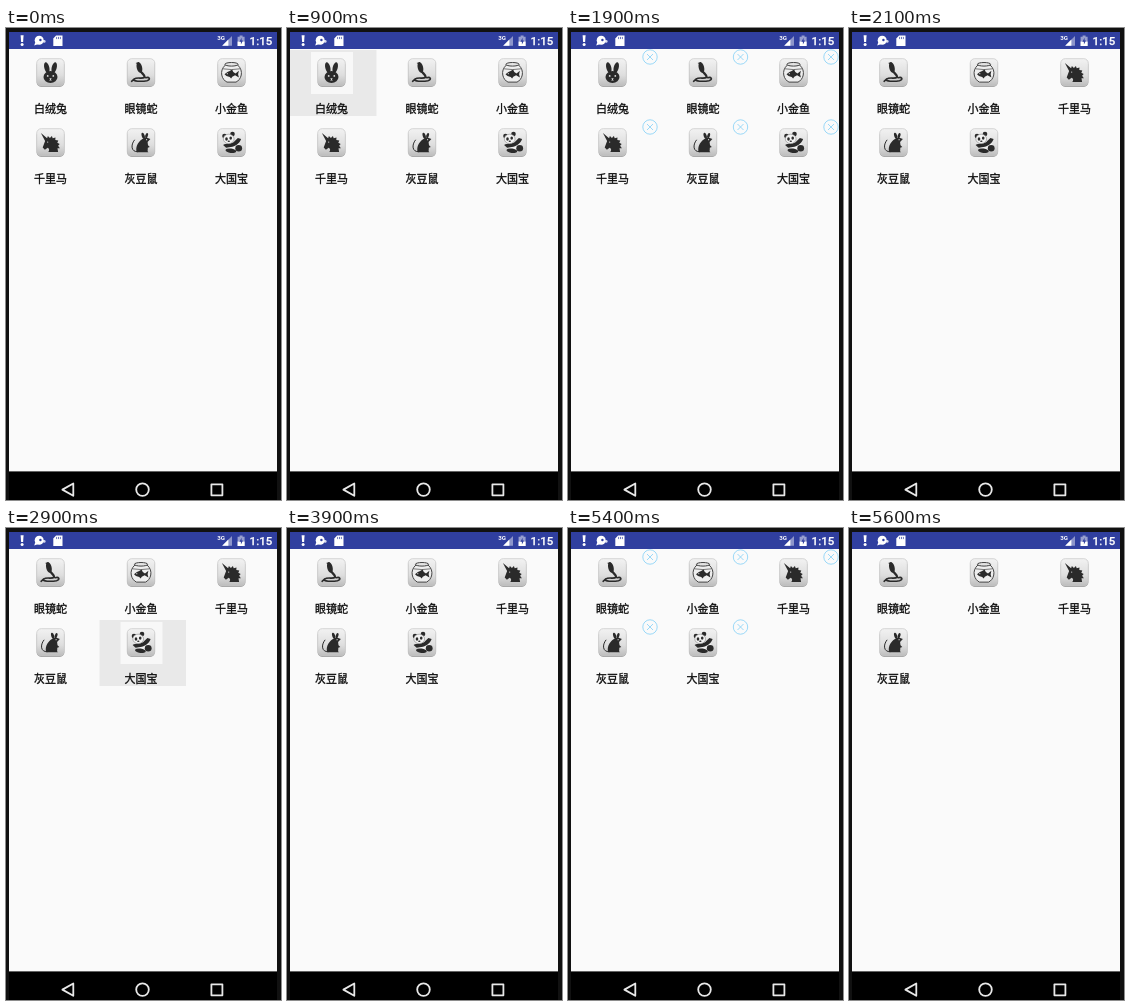
Write an HTML page that moves like this. It is 275 by 472 pixels and loops after 6900 ms.

```html
<!DOCTYPE html>
<html lang="zh-CN">
<head>
<meta charset="utf-8">
<style>
  html, body { margin: 0; height: 100%; overflow: hidden; background: #111; }
  svg { display: block; width: 100%; height: 100%; }
  .label { font: 500 11px "Noto Sans CJK SC", "Noto Sans CJK", sans-serif; text-anchor: middle; fill: #0c0c0c; stroke: #0c0c0c; stroke-width: .3; }
  .badge { fill: none; stroke: #8ad2f7; stroke-width: .85; }
  .clock { font: 500 11.5px Roboto, sans-serif; fill: #fff; stroke: #fff; stroke-width: .25; }
  .net { font: 700 6.2px Roboto, sans-serif; fill: #fff; }
  .line { fill: none; stroke: #2a2a2a; stroke-linecap: round; }
</style>
</head>
<body>
<svg viewBox="0 0 275 472">
  <defs>
    <linearGradient id="key" x2="0" y2="1">
      <stop offset="0" stop-color="#f2f2f2"/>
      <stop offset=".6" stop-color="#dedede"/>
      <stop offset="1" stop-color="#bcbcbc"/>
    </linearGradient>
  </defs>
  <rect width="275" height="472" fill="#111"/>
  <rect x="3" y="4" width="268" height="17" fill="#303f9f"/>
  <rect x="3" y="21" width="268" height="423" fill="#fafafa"/>
  <rect x="3" y="443.4" width="268" height="28.6"/>

  <g fill="#fff">
    <path d="M14.6 7.3h3l-.5 6.8h-2z"/>
    <circle cx="16.1" cy="16.6" r="1.5"/>
    <path d="M47.3 10.4l2.8-2.9h6.4V18h-9.2z"/>
    <path d="M50.6 8.9v2.2M52.5 8.9v2.2M54.4 8.9v2.2" stroke="#303f9f" stroke-width=".7"/>
    <circle cx="33.2" cy="12.2" r="4.5"/>
    <circle cx="34.4" cy="12" r="1.2" fill="#303f9f"/>
    <path d="M29.4 14l-1.2 3.6 3.6-1.4z"/>
    <circle cx="38.2" cy="13.4" r="1.4" opacity=".8"/>
    <path d="M226 8v9.8h-9.8z" opacity=".45"/>
    <path d="M222.4 11.6v6.2h-6.2z"/>
    <path d="M231.6 8.8h2V7.6h3v1.2h2V18h-7z" opacity=".5"/>
    <path d="M231.6 13.6h7V18h-7z"/>
    <path d="M235.6 9.7l-2.2 4h1.5v2.7l2.1-3.9h-1.4z" fill="#303f9f"/>
  </g>
  <text class="net" x="211.2" y="11.9">3G</text>
  <text class="clock" x="243.6" y="17">1:15</text>

  <g id="grid"></g>

  <g fill="none" stroke="#e8e8e8" stroke-width="1.8" stroke-linejoin="round">
    <path d="M67.3 455.5v12.3L56.4 461.6z"/>
    <circle cx="136.5" cy="461.6" r="6.3"/>
    <rect x="205.4" y="456.3" width="11" height="11"/>
  </g>
</svg>
<script>
const LOOP = 6900;

// removed: when the cell is deleted; pressed: spans with the touch highlight
const animals = [
  { name: '白绒兔', removed: 2100, pressed: [[900, 1900]], art: `
    <ellipse cx="-3.7" cy="-4.8" rx="2.5" ry="5.6" transform="rotate(-14 -3.7 -4.8)"/>
    <ellipse cx="3.7" cy="-4.8" rx="2.5" ry="5.6" transform="rotate(14 3.7 -4.8)"/>
    <ellipse cy="4.6" rx="7" ry="6"/>
    <g fill="#ddd"><circle cx="-2.8" cy="3.4" r=".9"/><circle cx="2.8" cy="3.4" r=".9"/>
    <path d="M-1.2 5.8h2.4L.4 7l1 1.1h-2.8L-.4 7z"/></g>` },
  { name: '眼镜蛇', art: `
    <ellipse cx="-1.6" cy="-5" rx="2.7" ry="5.4" transform="rotate(-14 -1.6 -5)"/>
    <path d="M-5.4-9.4L-2-10.5L-1.5-7z"/>
    <path class="line" stroke-width="2.3" d="M-.6-1.5C.8 1 4 2.6 3.6 4.6"/>
    <path class="line" stroke-width="1.6" d="M3.6 4.6C1.5 7-3.5 4.2-7 6.6C-9.5 9 1 9.2 6 8.2C10.5 6.8 7.8 4 4.8 5.2M-7 6.6L-9.4 8.8"/>` },
  { name: '小金鱼', art: `
    <path d="M-6-7.6C-13-1.5-9.5 7.5-4.5 9.6H4.5C9.5 7.5 13-1.5 6-7.6z" fill="#eee" stroke="#444" stroke-width="1"/>
    <ellipse cy="-8.2" rx="6.6" ry="1.8" fill="#e4e4e4" stroke="#444" stroke-width="1"/>
    <path class="line" stroke-width=".6" d="M-8-3.6Q0-2.2 8-3.6"/>
    <path d="M-7 1.8Q-3.8-1.2-1.8-1.4L.6-3L1.8-.6L4 1L7.4-1.8L6.6 1.8L7.4 5L3.6 2.8L.8 4.2L-.4 6L-1.8 4.6Q-5 4.4-7 1.8z"/>
    <circle cx="-4.2" cy="1.2" r=".6" fill="#ddd"/>` },
  { name: '千里马', art: `
    <path d="M-9.6-9.6L-3.4-4.2L-2.6-6.6L-.6-4.6L1.4-6.6L2.2-4.2L5-5L4.8-2.4L7.8-2L6.8.2L9.2 1.6L7.6 3.2L9.4 5.8L7 5.8L7.6 9.6H-2.2C-.8 7.4-1.2 6-2.8 5.2L-5.6 7.2L-7.8 5L-5.4-1.6z"/>
    <circle cx="-2.8" cy="-.4" r=".6" fill="#ddd"/>` },
  { name: '灰豆鼠', art: `
    <path d="M-4.2 9.8C-6.2 4 -2-2.6 3.4-4.6L5.4-5L9.4-3.4L6.6-.4L7 2.8L8.8 4.4L6.8 5.2C7 7.4 6 8.6 7.4 9.8z"/>
    <ellipse cx="2.2" cy="-6.6" rx="1.5" ry="3.2" transform="rotate(-16 2.2 -6.6)"/>
    <ellipse cx="5.6" cy="-6.8" rx="1.3" ry="2.8" transform="rotate(18 5.6 -6.8)"/>
    <path class="line" stroke-width="1" d="M-3.4 9.2C-10 9.6-10.5 2.5-6.6-2.4"/>
    <circle cx="5.6" cy="-2.8" r=".6" fill="#ddd"/>` },
  { name: '大国宝', removed: 5600, pressed: [[2900, 3900], [4300, 5400]], art: `
    <ellipse cx="2" cy="3.2" rx="7" ry="5" fill="#efefef" transform="rotate(18 2 3.2)"/>
    <path d="M-8.4 2.4C-5 .6-1 1.8 2-.2L6.4-4.6L9.6-3.4C8.6 0 5 3.4 1 4.2L-5.4 5.2z"/>
    <ellipse cx="7.2" cy="5.8" rx="3.4" ry="3.2"/>
    <ellipse cx="-.6" cy="8.2" rx="5.4" ry="2.2" transform="rotate(8 -.6 8.2)"/>
    <circle cx="-7" cy="-6.4" r="2.3"/><circle cx="1" cy="-8.4" r="2.3"/>
    <ellipse cx="-2.8" cy="-3.6" rx="5.4" ry="4.7" fill="#f2f2f2" stroke="#777" stroke-width=".5"/>
    <ellipse cx="-5" cy="-3.5" rx="1.3" ry="1.7"/><ellipse cx="-.8" cy="-4.4" rx="1.3" ry="1.7"/>
    <ellipse cx="-2.7" cy="-1.2" rx="1.2" ry=".8"/>` },
];

const cellMarkup = ({ name, art }) => `<g>
  <g class="press"><rect width="86.5" height="66" fill="#e9e9e9"/>
    <rect x="21" y="2" width="42" height="42" fill="#f8f8f8"/></g>
  <g transform="translate(41.5 22.5)" fill="#2a2a2a">
    <rect x="-13.8" y="-12" width="27.6" height="26.4" rx="4.5" fill="#9a9a9a"/>
    <rect x="-13.8" y="-13.8" width="27.6" height="27.3" rx="4.5" fill="url(#key)" stroke="#c6c6c6" stroke-width=".7"/>
    ${art}</g>
  <text class="label" x="41.5" y="62.6">${name}</text>
  <path class="badge" d="M71.8 7a7.2 7.2 0 1 0 14.4 0a7.2 7.2 0 1 0-14.4 0M76 4l6 6M82 4l-6 6"/>
</g>`;

const grid = document.getElementById('grid');
grid.innerHTML = animals.map(cellMarkup).join('');
const cells = animals.map((animal, i) => {
  const node = grid.children[i];
  return { ...animal, node, press: node.querySelector('.press'), badge: node.querySelector('.badge') };
});

const within = (t, spans = []) => spans.some(([from, to]) => t >= from && t < to);
const show = (node, on) => node.setAttribute('display', on ? 'inline' : 'none');

function render(now) {
  const t = now % LOOP;
  const editing = within(t, [[1300, 2100], [4700, 5600]]);
  let slot = 0;
  for (const { node, press, badge, removed = LOOP, pressed } of cells) {
    const present = t < removed;
    show(node, present);
    if (!present) continue;
    node.setAttribute('transform', `translate(${3 + slot % 3 * 90.5} ${22 + Math.floor(slot / 3) * 70})`);
    show(press, within(t, pressed));
    show(badge, editing);
    slot++;
  }
  requestAnimationFrame(render);
}
render(performance.now());
</script>
</body>
</html>
```
